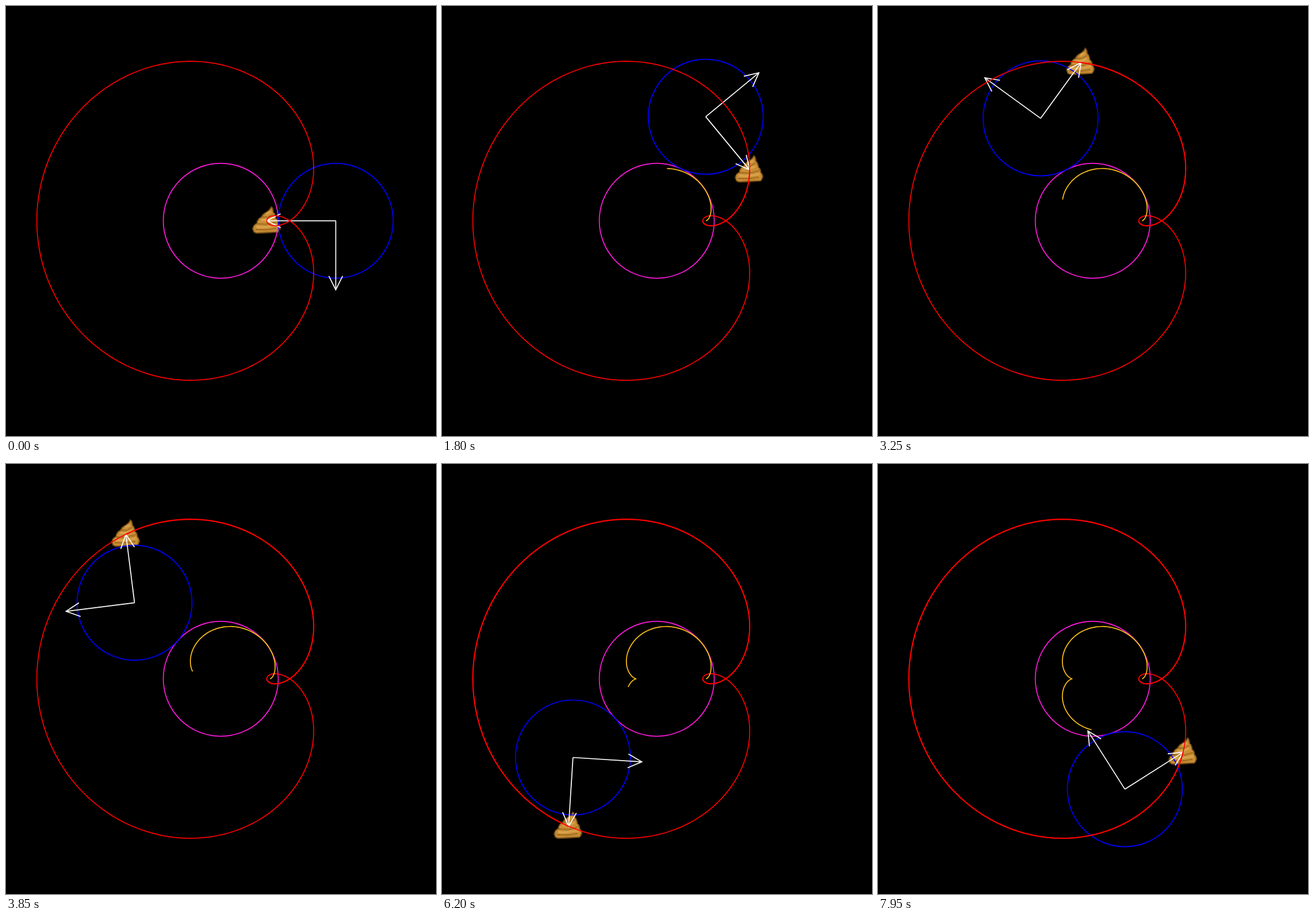
Write an HTML page with a canvas that moves like this. It is 748 px wide and 748 px high and loops after 8 s.

```html
<!DOCTYPE html>
<html>
<head>
<meta charset="utf-8">
<style>
  html, body { margin: 0; height: 100%; overflow: hidden; background: #000; }
  canvas { display: block; }
</style>
</head>
<body>
<canvas id="stage" width="748" height="748"></canvas>
<script>
const ctx = document.getElementById('stage').getContext('2d');
const MID = 373.6, UNIT = 100, ARM = 1.2;
const LOOP = 8000, STEP = 50, STEP_ANGLE = Math.PI / 100;
const { sin, cos, PI } = Math;

// Unit coordinates with y up, converted to pixels.
const toPixel = (x, y) => [MID + x * UNIT, MID - y * UNIT];

// Path of the arm's end while one unit circle rolls around another.
const roulette = a => toPixel(
  2 * cos(a) - ARM * cos(2 * a),
  2 * sin(a) - ARM * sin(2 * a));

// Centre of curvature of the roulette.
function evolute(a) {
  const c = cos(a), s = sin(a), c2 = cos(2 * a), s2 = sin(2 * a);
  const x = 2 * c - ARM * c2, y = 2 * s - ARM * s2;
  const dx = -2 * s + 2 * ARM * s2, dy = 2 * c - 2 * ARM * c2;
  const ddx = -2 * c + 4 * ARM * c2, ddy = -2 * s + 4 * ARM * s2;
  const k = (dx * dx + dy * dy) / (dx * ddy - dy * ddx);
  return toPixel(x - dy * k, y + dx * k);
}

function stroke(color, points, width = 1.7) {
  ctx.strokeStyle = color;
  ctx.lineWidth = width;
  ctx.beginPath();
  points.forEach(p => ctx.lineTo(...p));
  ctx.stroke();
}

const curve = (fn, steps) =>
  Array.from({ length: steps + 1 }, (_, i) => fn(i * STEP_ANGLE));

function circle(color, x, y) {
  ctx.strokeStyle = color;
  ctx.lineWidth = 1.7;
  ctx.beginPath();
  ctx.arc(x, y, UNIT, 0, 2 * PI);
  ctx.stroke();
}

function arrow(x, y, angle) {
  const length = ARM * UNIT, back = length * 0.8, side = length * 0.1;
  ctx.save();
  ctx.translate(x, y);
  ctx.rotate(angle);
  stroke('#fff', [[0, 0], [length, 0]]);
  stroke('#fff', [[back, -side], [length, 0], [back, side]]);
  ctx.restore();
}

// Small swirl sprite, enlarged without smoothing.
function makeSwirl() {
  const sprite = document.createElement('canvas');
  sprite.width = sprite.height = 26;
  const g = sprite.getContext('2d');
  const body = new Path2D('M.6 20Q.5 16.5 4 15Q4.5 11 8 9.5Q10 6 13.5 4.5Q16 3 16.5 .6Q18.5 1 18.4 5Q21 7 20.8 10.5Q23 12 22.8 15Q24.6 16.5 24.5 19Q24 23 21 23L4 23.6Q1 23.5 .6 20Z');
  g.fillStyle = '#c98e36';
  g.fill(body);
  g.clip(body);
  g.strokeStyle = '#835512';
  g.lineWidth = 1.3;
  g.stroke(body);
  g.strokeStyle = '#dba54d';
  g.lineWidth = 1.8;
  g.stroke(new Path2D('M4 18Q13 19 22 16.5M8 12Q13 12.5 18 10M12 7L16 5'));
  g.strokeStyle = '#95631a';
  g.lineWidth = 0.9;
  g.stroke(new Path2D('M4 15.5Q13 17.5 21.5 13.5M3 20.5Q12 21.5 21 19.5M8 9.8Q14 11 18.5 7'));
  return sprite;
}

const swirl = makeSwirl();
const redCurve = curve(roulette, 200);
const goldCurve = curve(evolute, 200);
ctx.imageSmoothingEnabled = false;

function draw(now) {
  const step = Math.floor((now % LOOP) / STEP);
  const angle = step * STEP_ANGLE;
  const [cx, cy] = toPixel(2 * cos(angle), 2 * sin(angle));
  const [px, py] = roulette(angle);
  const armAngle = PI - 2 * angle;

  ctx.fillStyle = '#000';
  ctx.fillRect(0, 0, 748, 748);
  ctx.drawImage(swirl, Math.round(px - 26), Math.round(py - 26), 52, 52);
  circle('#ff1adc', MID, MID);
  circle('#00f', cx, cy);
  arrow(cx, cy, armAngle);
  arrow(cx, cy, armAngle - PI / 2);
  stroke('#f00', redCurve);
  stroke('#f00', redCurve.slice(0, step + 1), 2);
  stroke('#ffc21a', goldCurve.slice(0, step + 1));
}

const start = performance.now();
function tick() {
  draw(performance.now() - start);
  requestAnimationFrame(tick);
}
tick();
</script>
</body>
</html>
```
